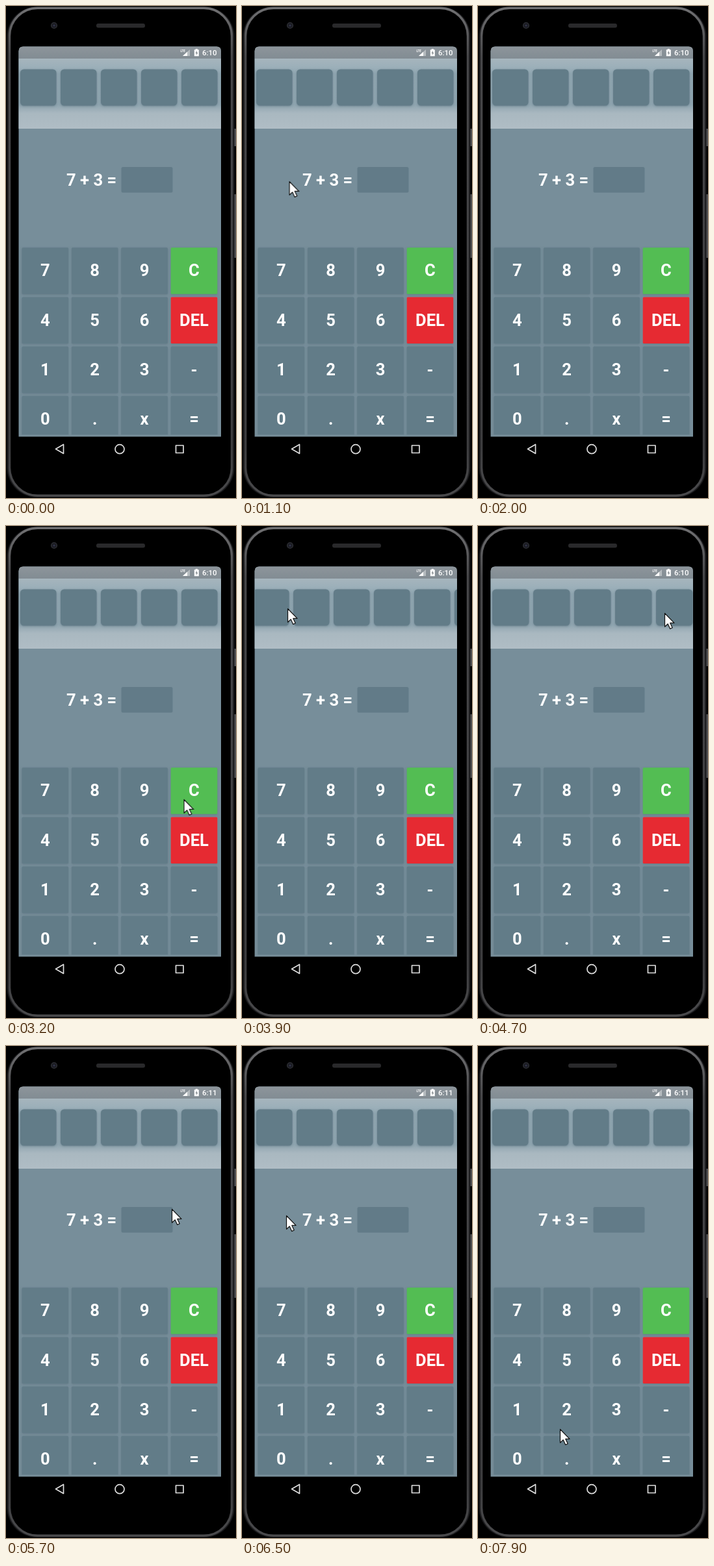
Animation of 354x758 px, one loop 8000 ms. Source, as an HTML page:

```html
<!DOCTYPE html>
<html lang="en">
<head>
<meta charset="utf-8">
<title>Sum keypad</title>
<style>
html, body { margin: 0; width: 100%; height: 100%; overflow: hidden; background: #000; }
svg { display: block; width: 354px; height: 758px; }
text { font-family: Roboto, Arial, sans-serif; font-weight: 700; font-size: 25.6px; fill: #fff; }
.key text { text-anchor: middle; }
.status text { font-size: 11.5px; font-weight: 500; }
.status .net { font-size: 4.5px; font-weight: 700; }

/* the picture advances in 100 ms steps */
.tiles, .cursor, .pointer, .early, .late { animation: 8s step-end -4ms infinite; }
.tiles { animation-name: drag; }
.cursor { animation-name: show; }
.pointer { animation-name: move; }
.early { animation-name: early; }
.late { animation-name: late; }

@keyframes drag {
  0% { transform: translateX(0) scaleX(1); }
  45% { transform: translateX(0) scaleX(1); animation-timing-function: steps(3); }
  48.75% { transform: translateX(-191px) scaleX(1); animation-timing-function: steps(7); }
  57.5% { transform: translateX(0) scaleX(1); }
  58.75% { transform: translateX(0) scaleX(1.016); animation-timing-function: steps(3); }
  62.5%, 100% { transform: translateX(0) scaleX(1); }
}
@keyframes show {
  0%, 25% { visibility: hidden; }
  10%, 32.5%, 100% { visibility: visible; }
}
@keyframes early {
  0% { visibility: visible; }
  62.5%, 100% { visibility: hidden; }
}
@keyframes late {
  0% { visibility: hidden; }
  62.5%, 100% { visibility: visible; }
}
@keyframes move {
  0% { transform: translate(38px, 258px); }
  10% { transform: translate(38px, 258px); animation-timing-function: steps(4); }
  15% { transform: translate(84px, 274px); animation-timing-function: steps(4); }
  20% { transform: translate(128px, 273px); }
  21.25% { transform: translate(127px, 262px); }
  22.5% { transform: translate(124px, 276px); }
  32.5% { transform: translate(308px, 664px); animation-timing-function: steps(8); }
  42.5% { transform: translate(262px, 340px); animation-timing-function: steps(2); }
  45% { transform: translate(261px, 128px); animation-timing-function: steps(3); }
  48.75% { transform: translate(70px, 127px); animation-timing-function: steps(7); }
  57.5% { transform: translate(261px, 133px); }
  58.75% { transform: translate(287px, 134px); animation-timing-function: steps(5); }
  65% { transform: translate(270px, 150px); animation-timing-function: steps(5); }
  71.25% { transform: translate(255px, 251px); animation-timing-function: steps(4); }
  76.25% { transform: translate(150px, 270px); animation-timing-function: steps(4); }
  81.25% { transform: translate(68px, 261px); animation-timing-function: steps(5); }
  87.5% { transform: translate(194px, 282px); }
  88.75% { transform: translate(200px, 300px); animation-timing-function: steps(6); }
  96.25% { transform: translate(113px, 562px); animation-timing-function: steps(2); }
  98.75%, 100% { transform: translate(126px, 590px); }
}
</style>
</head>
<body>
<svg viewBox="0 0 354 758">
  <defs>
    <linearGradient id="bar" x2="0" y2="1">
      <stop stop-color="#8d959b"/><stop offset="1" stop-color="#828c93"/>
    </linearGradient>
    <linearGradient id="shelf" x2="0" y2="1">
      <stop stop-color="#a6b5bd"/><stop offset=".13" stop-color="#9bafb9"/>
      <stop offset=".22" stop-color="#8fa5b0"/><stop offset=".66" stop-color="#8ea4af"/>
      <stop offset=".78" stop-color="#a9b8c0"/><stop offset="1" stop-color="#b0bdc5"/>
    </linearGradient>
    <linearGradient id="rim" x2="0" y2="1">
      <stop stop-color="#707072"/><stop offset=".1" stop-color="#464648"/>
      <stop offset=".9" stop-color="#3c3c3e"/><stop offset="1" stop-color="#4a4a4c"/>
    </linearGradient>
    <filter id="soft" x="-20%" y="-20%" width="140%" height="140%">
      <feDropShadow dx="0" dy="1" stdDeviation="1.6" flood-color="#4e6673" flood-opacity=".5"/>
    </filter>
    <clipPath id="screen"><path d="M19.5 663.5V69.5q0-7 7-7H324q7 0 7 7V663.5z"/></clipPath>
    <clipPath id="pad"><rect x="19" y="368" width="312" height="292.5"/></clipPath>
  </defs>

  <rect width="354" height="758"/>
  <path d="M352.5 189v27M352.5 290v98" stroke="#4d4d4f" stroke-width="3"/>
  <rect x="1.5" y="1" width="350" height="756" rx="46" fill="#1b1b1d"/>
  <rect x="5.5" y="3.2" width="342" height="751" rx="43" fill="#000" stroke="url(#rim)" stroke-width="3.4"/>
  <circle cx="74" cy="30" r="4.4" fill="#1b1c22" stroke="#2e2f35" stroke-width="1.4"/>
  <circle cx="74" cy="30" r="1.6" fill="#30334a"/>
  <rect x="139" y="27" width="75" height="6.5" rx="3" fill="#29292b"/>

  <g clip-path="url(#screen)">
    <rect x="19" y="62" width="312" height="602" fill="#778e9a"/>
    <rect x="19" y="81" width="312" height="108" fill="url(#shelf)"/>
    <g transform="translate(19 97)"><g class="tiles" id="tiles" fill="#627b88"></g></g>
    <rect x="19" y="62" width="312" height="19" fill="url(#bar)"/>

    <g class="status" fill="#fff">
      <text class="net" x="268.5" y="70.5">LTE</text>
      <path d="M283 67V77H272z" fill-opacity=".4"/>
      <path d="M279 70.6V77H272z"/>
      <path d="M291.8 66h3v1.2h2V77.3h-7V67.2h2z"/>
      <path d="M293.8 68.8l-2.3 4h1.5v3l2.3-4h-1.5z" fill="#858b90"/>
      <text class="early" x="302" y="76">6:10</text>
      <text class="late" x="302" y="76">6:11</text>
    </g>

    <text x="93" y="277">7 + 3 =</text>
    <rect x="177.5" y="248" width="79" height="39.5" rx="2.5" fill="#627b88"/>
    <g clip-path="url(#pad)" id="keys"></g>
  </g>

  <g fill="none" stroke="#dedede" stroke-width="1.7" stroke-linejoin="round">
    <path d="M76.5 682.5L88.5 675.5V689.5z"/>
    <circle cx="175" cy="682.7" r="7"/>
    <rect x="261.5" y="677" width="11.5" height="11.5"/>
  </g>

  <g class="cursor"><g class="pointer">
    <path d="M.5.5V21.2L5.2 16.8L8.7 24.4L12.2 22.8L8.8 15.4H15z" fill="#fff" stroke="#111" stroke-width="1.2" stroke-linejoin="round"/>
  </g></g>
</svg>
<script>
const tileCount = 10;
const labels = ["7", "8", "9", "C", "4", "5", "6", "DEL", "1", "2", "3", "-", "0", ".", "x", "="];
const accents = { C: "#52bd52", DEL: "#e62b33" };

function add(parent, name, attrs, text = "") {
  const el = document.createElementNS("http://www.w3.org/2000/svg", name);
  for (const key in attrs) el.setAttribute(key, attrs[key]);
  el.textContent = text;
  return parent.appendChild(el);
}

const tiles = document.getElementById("tiles");
for (let i = 0; i < tileCount; i++) {
  add(tiles, "rect", { x: 3 + 62 * i, y: 0.5, width: 55.5, height: 56, rx: 5.5, filter: "url(#soft)" });
}

const keys = document.getElementById("keys");
labels.forEach((label, i) => {
  const x = 24.5 + 76.4 * (i % 4);
  const y = 372.2 + 76.2 * Math.floor(i / 4);
  const key = add(keys, "g", { class: "key" });
  add(key, "rect", {
    x, y, width: 71.6, height: 71.6, rx: 1.5,
    fill: accents[label] || "#627b88", filter: "url(#soft)"
  });
  add(key, "text", { x: x + 35.8, y: y + 44.2 }, label);
});
</script>
</body>
</html>
```
